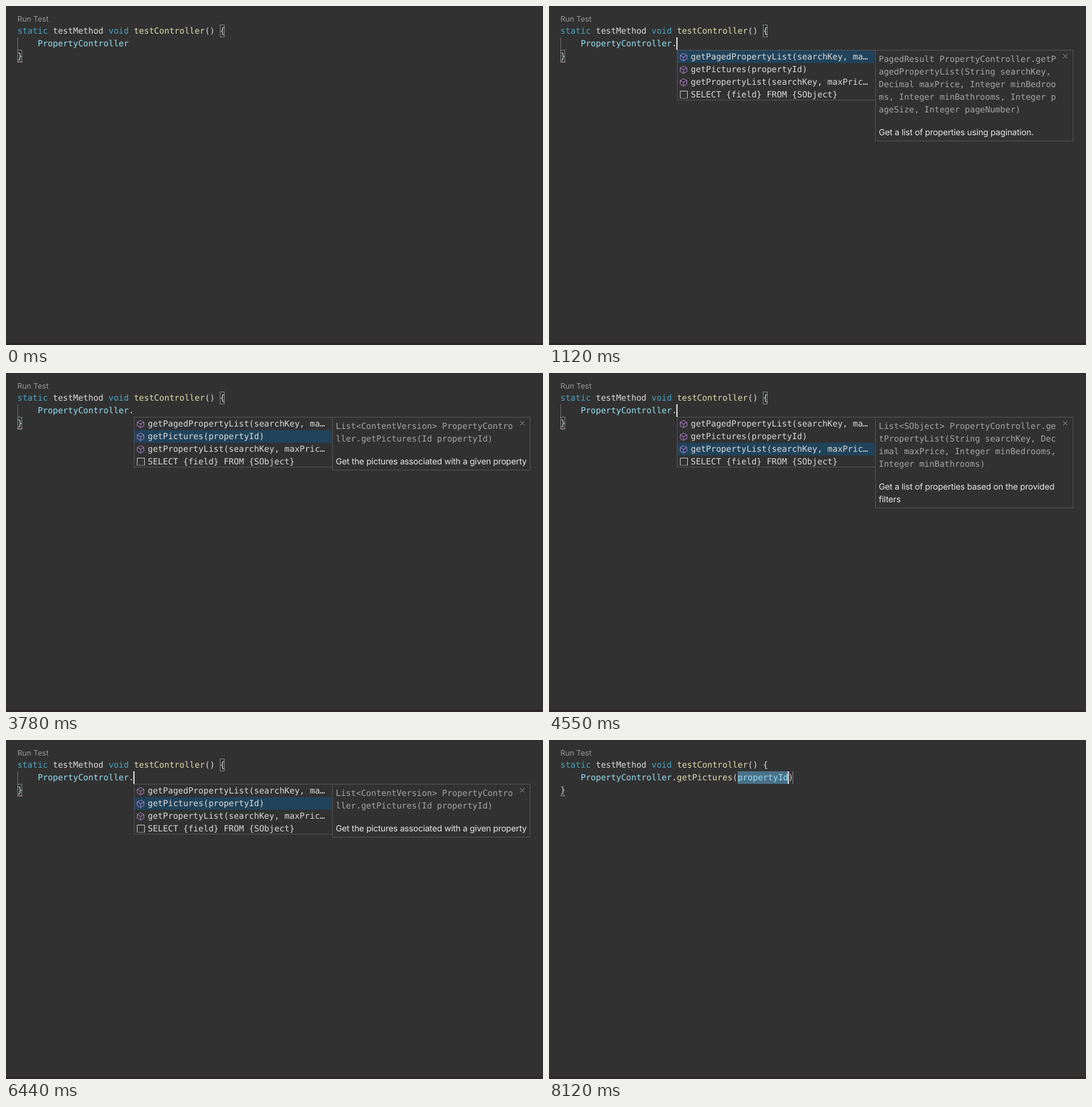
These frames come from a looping animation (894x564 px, 8610 ms). An HTML page:

```html
<!DOCTYPE html>
<html lang="en">
<head>
<meta charset="utf-8">
<title>Code completion</title>
<style>
  html, body { margin: 0; width: 100%; height: 100%; overflow: hidden; background: #313131; }
  svg { display: block; width: 894px; height: 564px; }
  text { white-space: pre; text-rendering: geometricPrecision; fill: #dadada; }
  .code { font: 14px "DejaVu Sans Mono", monospace; }
  .prose { font: 14px Inter, sans-serif; letter-spacing: -.15px; fill: #e8e8e8; }
  .lens { font: 12.6px Inter, sans-serif; fill: #999; }
  .keyword { fill: #4aa4c1; }
  .call { fill: #dcdcae; }
  .name { fill: #97dff1; }
  .muted { fill: #a5a5a5; }
</style>
</head>
<body>
<svg id="stage" viewBox="0 0 894 564"></svg>
<script>
const LOOP = 8610;
const CHAR = 8.428, LEFT = 19, ROW = 21;
const TYPED = 70, LIST_OPEN = 140, DOC_OPEN = 210, ACCEPTED = 7980;

// Selected row of the list from each time on
const selections = [[0, 0], [1960, 1], [4340, 2], [6370, 1]];
// Caret visibility flips at each time
const blinks = [70, 630, 1120, 1680, 2170, 2730, 3220, 3780, 4340, 4830, 5320, 5880, 6370, 6930, 7420];

const items = [
  'getPagedPropertyList(searchKey, ma…',
  'getPictures(propertyId)',
  'getPropertyList(searchKey, maxPric…',
  'SELECT {field} FROM {SObject}',
];

const docs = [
  {
    height: 151,
    code: ['PagedResult PropertyController.getP', 'agedPropertyList(String searchKey, ',
      'Decimal maxPrice, Integer minBedroo', 'ms, Integer minBathrooms, Integer p',
      'ageSize, Integer pageNumber)'],
    prose: ['Get a list of properties using pagination.'],
  },
  {
    height: 88,
    code: ['List&lt;ContentVersion> PropertyContro', 'ller.getPictures(Id propertyId)'],
    prose: ['Get the pictures associated with a given property'],
  },
  {
    height: 151,
    code: ['List&lt;SObject> PropertyController.ge', 'tPropertyList(String searchKey, Dec',
      'imal maxPrice, Integer minBedrooms,', 'Integer minBathrooms)'],
    prose: ['Get a list of properties based on the provided', 'filters'],
  },
];

const col = n => LEFT + n * CHAR;
const text = (x, y, body, cls = 'code') => `<text x="${x}" y="${y}" class="${cls}">${body}</text>`;
const span = (cls, body) => `<tspan class="${cls}">${body}</tspan>`;
const rect = (x, y, w, h, fill) => `<rect x="${x}" y="${y}" width="${w}" height="${h}" fill="${fill}"/>`;
const frame = (x, y, w, h, stroke, fill = 'none') =>
  `<rect x="${x + .5}" y="${y + .5}" width="${w - 1}" height="${h - 1}" fill="${fill}" stroke="${stroke}"/>`;
const line = (d, stroke, extra = '') => `<path d="${d}" fill="none" stroke="${stroke}" ${extra}/>`;
const group = (id, body) => `<g id="${id}">${body}</g>`;

const cube = y => line(
  `M224 ${y - 6}l5.5 3v6.2l-5.5 3l-5.5 -3v-6.2zM218.5 ${y - 3}l5.5 3l5.5 -3M224 ${y}v6.2`,
  '#b082d3', 'stroke-linejoin="round"');

const snippet = line('M218.5 153V141.5H230.5V153', '#d0d0d0') +
  line('M218 153.5H231', '#d0d0d0', 'stroke-dasharray="1 1"');

const list = rect(213, 73, 330, 84, '#313131') +
  `<rect id="highlight" x="214" width="328" height="${ROW}" fill="#21435a"/>` +
  frame(213, 73, 331, 84, '#555') +
  items.map((label, i) => (i < 3 ? cube(85 + i * ROW) : snippet) + text(236, 89 + i * ROW, label)).join('');

const docPanel = (doc, i) => group('doc' + i,
  frame(543, 73, 330, doc.height + (i === 1 ? 1 : 1), '#555', '#313131') +
  doc.code.map((s, n) => text(549, 93 + n * ROW, s, 'code muted')).join('') +
  doc.prose.map((s, n) => text(549, 73 + doc.height - 9 - (doc.prose.length - 1 - n) * ROW, s, 'prose')).join('') +
  line('M856 80l7 7m0 -7l-7 7', '#a0a0a0'));

const squiggle = (id, stroke) =>
  `<path id="${id}" d="M19 93.5l2 -2l2 2l2 -2l2 2" fill="none" stroke="${stroke}"/>`;

const stage = document.getElementById('stage');
stage.innerHTML =
  rect(0, 0, 894, 564, '#313131') + rect(0, 560, 894, 4, '#2e282b') +
  text(LEFT, 26, 'Run Test', 'lens') +
  group('editing',
    frame(356, 31, 8, 21, '#858585', '#2d332f') +
    frame(19, 73, 8, 21, '#858585', '#2d332f') +
    rect(19, 52, 1, 21, '#707070')) +
  text(LEFT, 46, span('keyword', 'static') + ' testMethod ' + span('keyword', 'void') + ' ' +
    span('call', 'testController') + '() {') +
  rect(0, 0, 0, 0, 'none') +
  group('accepted',
    rect(314, 52, 84, 21, '#4a7088') +
    text(col(23), 67, span('call', 'getPictures') + '(' + span('name', 'propertyId') + ')') +
    rect(397.5, 52, 2, 21, '#e4e4e4') + rect(405.5, 52, 1, 21, '#8a8a8a')) +
  text(col(4), 67, 'PropertyController', 'code name') +
  group('dot', text(col(22), 67, '.')) +
  text(LEFT, 88, '}') +
  squiggle('error', '#c08888') + squiggle('notice', '#bdbdbd') +
  group('list', list) + docs.map(docPanel).join('') +
  group('caret', rect(212, 52, 2, 21, '#e4e4e4'));

const show = (id, on) => {
  document.getElementById(id).style.display = on ? '' : 'none';
};

function draw(t) {
  const done = t >= ACCEPTED;
  const selected = selections.filter(([start]) => t >= start).pop()[1];
  show('editing', !done);
  show('error', !done);
  show('notice', done);
  show('accepted', done);
  show('dot', t >= TYPED);
  show('list', t >= LIST_OPEN && !done);
  docs.forEach((_, i) => show('doc' + i, t >= DOC_OPEN && !done && i === selected));
  show('caret', !done && blinks.filter(time => t >= time).length % 2 === 1);
  document.getElementById('highlight').setAttribute('y', 74 + selected * ROW);
}

const start = performance.now();
function tick() {
  draw((performance.now() - start) % LOOP);
  requestAnimationFrame(tick);
}
draw(0);
requestAnimationFrame(tick);
</script>
</body>
</html>
```
